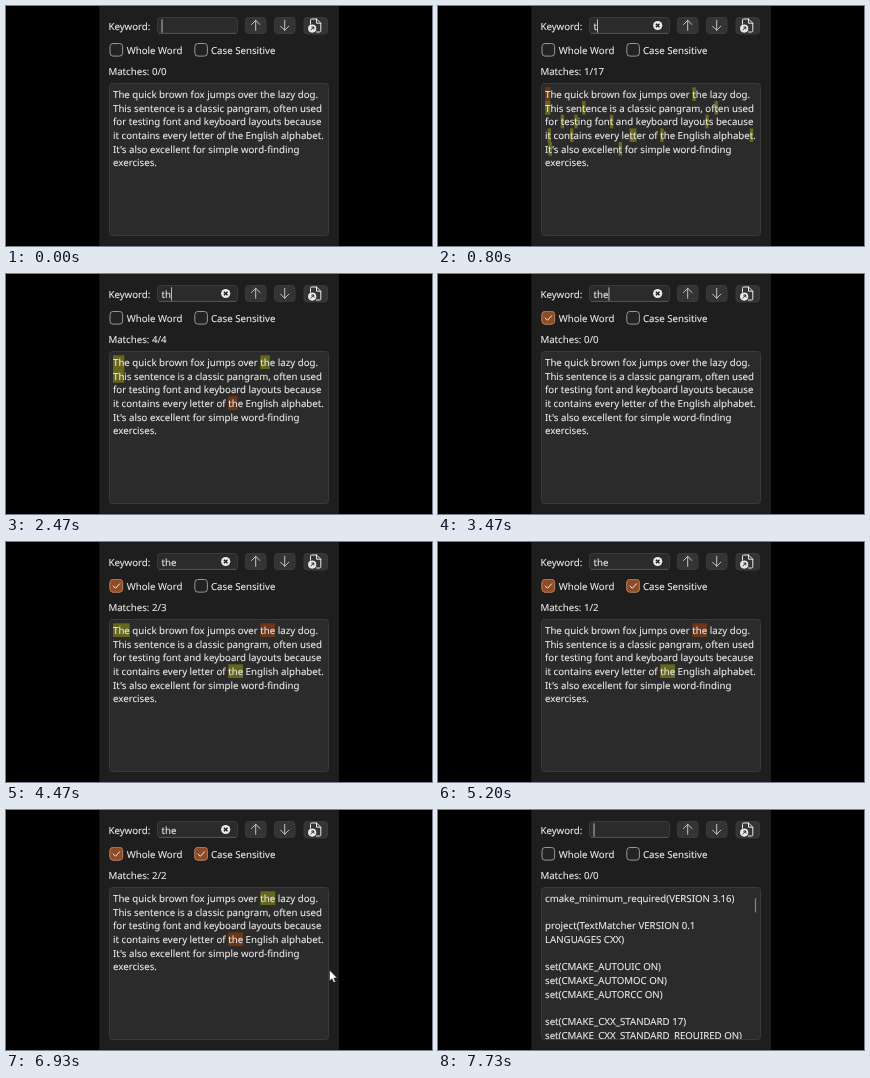
An HTML page that plays this animation: 426 by 240 pixels, repeating every 7790 ms.

```html
<!DOCTYPE html>
<html lang="en">
<head>
<meta charset="utf-8">
<title>Text matcher</title>
<style>
html, body { margin: 0; width: 100%; height: 100%; overflow: hidden; background: #000; }
svg { display: block; width: 100vw; height: 100vh; }
text {
  font: 9.68px "Noto Sans", "Open Sans", sans-serif; fill: #ececec; stroke: #ececec; stroke-width: .1;
  text-rendering: geometricPrecision; white-space: pre;
}
.box { fill: #2b2b2b; stroke: #3a3a3a; }
.button { fill: #343434; stroke: #3a3a3a; }
.line { fill: none; stroke: #ececec; stroke-linecap: round; stroke-linejoin: round; }
.dim { stroke: #c6c6c6; }
</style>
</head>
<body>
<svg viewBox="0 0 426 240">
  <defs>
    <clipPath id="page"><rect x="104" y="78" width="218" height="151"/></clipPath>
    <path id="arrow" class="line dim" d="M0 5V-5M-4.2 -.8L0 -5L4.2 -.8"/>
  </defs>
  <rect width="426" height="240"/>
  <rect x="93.3" width="239.7" height="240" fill="#1e1e1e"/>

  <text x="102.4" y="24">Keyword:</text>
  <rect class="box" x="151.5" y="11.5" width="80" height="16" rx="3"/>
  <path d="M153 27.4H230" stroke="#7c4a2e" stroke-width=".9"/>
  <text id="word" x="155.5" y="24"></text>
  <path id="caret" stroke="#cfcfcf" stroke-width=".9"/>
  <g id="clear">
    <circle cx="219.7" cy="19.5" r="4.6" fill="#ececec"/>
    <path d="M217.9 17.7l3.6 3.6m0 -3.6l-3.6 3.6" stroke="#222" stroke-width="1.5"/>
  </g>

  <rect class="button" x="239.5" y="11.5" width="20.5" height="16" rx="3"/>
  <use href="#arrow" x="249.7" y="19.3"/>
  <rect class="button" x="268.5" y="11.5" width="20.5" height="16" rx="3"/>
  <use href="#arrow" transform="translate(278.7 19.3) rotate(180)"/>
  <rect class="button" x="298" y="11.5" width="23.5" height="16.5" rx="3"/>
  <path class="line" d="M304.5 18V14.3Q304.5 13 305.8 13H310.5L314.8 17.2V24.7Q314.8 26 313.5 26H310.5M310.5 13V17.2H314.8"/>
  <circle cx="306.2" cy="22.6" r="4.1" fill="#ececec"/>
  <path d="M304.6 24.2L307.8 21M305.3 21H307.8V23.5" fill="none" stroke="#2b2b2b"/>

  <g id="checks"></g>
  <text x="120.7" y="48">Whole Word</text>
  <text x="205" y="48">Case Sensitive</text>
  <text id="count" x="102.4" y="68.7"></text>

  <rect class="box" x="103.5" y="77.5" width="219" height="152" rx="3"/>
  <g clip-path="url(#page)">
    <g id="marks"></g>
    <g id="lines"></g>
  </g>
  <path id="scroll" d="M317.5 88.5V102" stroke="#858585" stroke-width="1.2" stroke-linecap="round"/>
  <path id="mouse" transform="translate(323.5 160)" d="M0 0V11L2.5 8.7L4.2 12.6L6 11.8L4.3 8H7.7Z" fill="#fff" stroke="#111" stroke-width=".5"/>
</svg>
<script>
const LOOP = 7790, PITCH = 13.68, TOP = 81.3;
const PANGRAM = [
  "The quick brown fox jumps over the lazy dog.",
  "This sentence is a classic pangram, often used",
  "for testing font and keyboard layouts because",
  "it contains every letter of the English alphabet.",
  "It's also excellent for simple word-finding",
  "exercises."
];
const CMAKE = [
  "cmake_minimum_required(VERSION 3.16)", "",
  "project(TextMatcher VERSION 0.1", "LANGUAGES CXX)", "",
  "set(CMAKE_AUTOUIC ON)", "set(CMAKE_AUTOMOC ON)", "set(CMAKE_AUTORCC ON)", "",
  "set(CMAKE_CXX_STANDARD 17)", "set(CMAKE_CXX_STANDARD_REQUIRED ON)"
];
const WHOLE_AT = 2930, CASE_AT = 5070, FILE_AT = 7070, RESET_AT = 7600;

// time, keyword, current match (0 = no search result)
const STEPS = [
  [0, "", 0], [500, "t", 1], [870, "th", 1], [1330, "th", 2], [1870, "th", 3],
  [2330, "th", 4], [WHOLE_AT, "th", 0], [3400, "the", 0], [3670, "the", 1],
  [4200, "the", 2], [4700, "the", 3], [CASE_AT, "the", 1], [5670, "the", 2],
  [FILE_AT, "", 0]
];
const CARET_ON = [
  [0, 130], [500, 1130], [1400, 1930], [2270, 2800], [3270, 3930],
  [4600, 4930], [5270, 5670], [6200, 6530], [FILE_AT, 7270], [7660, LOOP]
];

const $ = id => document.getElementById(id);
const show = (node, on) => node.setAttribute("visibility", on ? "visible" : "hidden");
const clamp = v => Math.max(0, Math.min(1, v));

function add(parent, tag, attrs) {
  const node = document.createElementNS("http://www.w3.org/2000/svg", tag);
  for (const key in attrs) node.setAttribute(key, attrs[key]);
  return parent.appendChild(node);
}

const rows = CMAKE.map((_, i) => add($("lines"), "text", { x: 107, y: 92 + i * PITCH }));

function checkbox(x) {
  const box = { x, y: 37.5, width: 12.6, height: 12.6, rx: 3 };
  add($("checks"), "rect", { ...box, fill: "#232323", stroke: "#969696" });
  const on = add($("checks"), "g", {});
  add(on, "rect", { ...box, fill: "#8d4c27", stroke: "#b0714a" });
  add(on, "path", { class: "line", d: `M${x + 3.2} 44l2.3 2.3l4.2 -4.6` });
  return on;
}
const whole = checkbox(104), matchCase = checkbox(188.8);

function findMatches(word, t) {
  const edge = t >= WHOLE_AT ? "\\b" : "";
  const pattern = new RegExp(edge + word + edge, t >= CASE_AT ? "g" : "gi");
  return PANGRAM.flatMap((line, row) =>
    [...line.matchAll(pattern)].map(m => ({ row, from: m.index, to: m.index + word.length - 1 })));
}

function drawStep([t, word, current]) {
  const page = t >= FILE_AT ? CMAKE : PANGRAM;
  rows.forEach((row, i) => row.textContent = page[i] || "");
  show($("scroll"), page === CMAKE);
  $("word").textContent = word;
  show($("clear"), word);
  const x = word ? 156 + $("word").getComputedTextLength() : 156;
  $("caret").setAttribute("d", `M${x} 13.3V26.6`);

  const found = current ? findMatches(word, t) : [];
  $("count").textContent = `Matches: ${current}/${found.length}`;
  $("marks").replaceChildren();
  found.forEach(({ row, from, to }, i) => {
    const left = rows[row].getStartPositionOfChar(from).x;
    const right = rows[row].getEndPositionOfChar(to).x;
    add($("marks"), "rect", {
      x: left, y: TOP + row * PITCH, width: right - left, height: PITCH,
      fill: i + 1 === current ? "#6b3718" : "#66661c"
    });
  });
}

let shown;
function render(t) {
  const step = STEPS.findLast(s => s[0] <= t);
  if (step !== shown) drawStep(shown = step);
  show($("caret"), CARET_ON.some(([a, b]) => t >= a && t < b));
  const reset = 1 - clamp((t - RESET_AT + 60) / 130);
  const checked = at => Math.min(clamp((t - at + 30) / 130), reset);
  whole.setAttribute("opacity", checked(WHOLE_AT));
  matchCase.setAttribute("opacity", checked(CASE_AT));
  show($("mouse"), t >= 6800 && t < RESET_AT);
}

const start = performance.now();
function tick() {
  render((performance.now() - start) % LOOP);
  requestAnimationFrame(tick);
}
tick();
</script>
</body>
</html>
```
